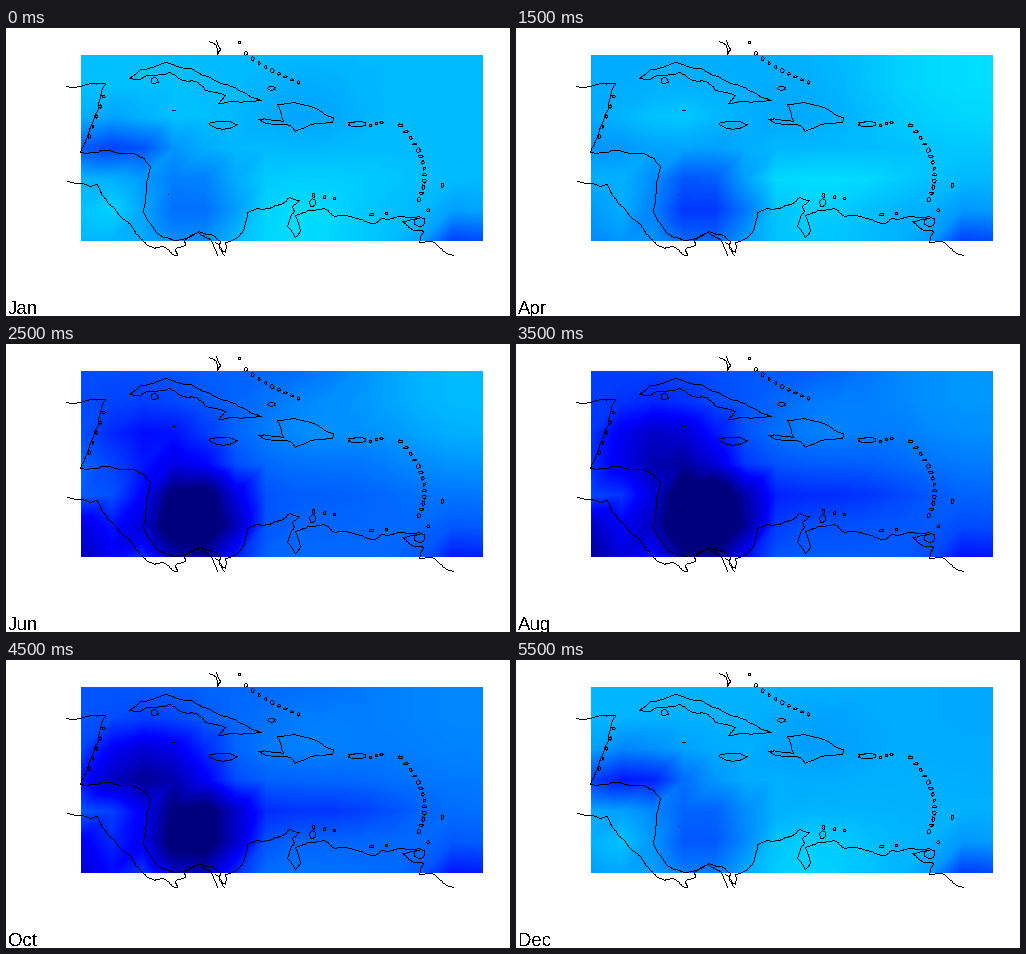
These frames come from a looping animation (504 by 288 pixels, 7.5 s). A matplotlib script:

```python
import numpy as np
import matplotlib.pyplot as plt
from matplotlib.animation import FuncAnimation
from matplotlib.colors import LinearSegmentedColormap, ListedColormap

W, H = 504, 288
LEFT, RIGHT, TOP, BOTTOM = 75, 477, 27, 213
COLS, ROWS = 14, 7
MONTHS = "Jan Feb Mar Apr May Jun Jul Aug Sep Oct Nov Dec".split()
rng = np.random.default_rng(4)

# ---- climate field: a base level plus soft seasonal spots ----
# column, row, width, height, dry-season level, wet-season level, late-year shift
SPOTS = [
    (3.6, 4.8, 1.7, 1.6, -0.28, -1.30, -0.05),   # Panama bight
    (1.1, 3.0, 1.7, 0.9, -0.45, -0.10, -0.22),   # Honduras
    (2.4, 2.4, 1.9, 1.2, 0.10, -0.50, -0.18),    # western arc
    (12.4, 6.0, 1.2, 0.9, -0.50, -0.30, 0.00),   # south-east corner
    (0.0, 5.8, 1.3, 1.2, 0.00, -0.75, -0.05),    # south-west corner
    (1.0, 4.6, 1.2, 1.0, 0.12, -0.08, 0.00),     # Pacific coast
    (13.0, 0.5, 4.5, 3.0, 0.02, 0.28, -0.10),    # open Atlantic
    (7.0, 4.0, 3.5, 0.9, 0.12, -0.15, -0.14),    # central basin
    (0.5, 0.6, 3.5, 1.6, 0.02, -0.12, 0.00),     # Yucatan channel
    (7.0, 5.6, 2.5, 1.0, 0.14, 0.00, 0.00),      # Colombian coast
    (7.3, 1.8, 1.8, 1.2, -0.09, 0.14, 0.00),     # Hispaniola
]


def season(month, dry, wet, late):
    phase = 2 * np.pi * (month - 6.5) / 12
    rain = 1 / (1 + np.exp(-4 * np.cos(phase)))
    return dry + (wet - dry) * rain + late * np.sin(phase)


def grid(month):
    r, c = np.mgrid[:ROWS, :COLS]
    g = np.full((ROWS, COLS), season(month, 0.75, 0.35, -0.04))
    for col, row, w, h, *levels in SPOTS:
        d = np.hypot((c - col) / w, (r - row) / h)
        g += season(month, *levels) * np.exp(-d ** 3)
    return g


def shade(g):
    """Linear interpolation on two triangles per cell."""
    x = (np.arange(RIGHT - LEFT) + 0.5) / (RIGHT - LEFT) * (COLS - 1)
    y = (np.arange(BOTTOM - TOP) + 0.5) / (BOTTOM - TOP) * (ROWS - 1)
    i, j = x.astype(int)[None, :], y.astype(int)[:, None]
    fx, fy = x[None, :] - i, y[:, None] - j
    nw, ne, sw, se = g[j, i], g[j, i + 1], g[j + 1, i], g[j + 1, i + 1]
    upper = nw + (ne - nw) * fx + (sw - nw) * fy
    lower = se + (sw - se) * (1 - fx) + (ne - se) * (1 - fy)
    return np.where(fx + fy <= 1, upper, lower)


fields = [shade(grid(m)) for m in range(12)]

# ---- coastlines: key points, roughened, drawn one pixel wide ----
ink = np.zeros((H, W))


def stroke(pts):
    for a, b in zip(pts[:-1], pts[1:]):
        n = int(np.abs(b - a).max()) + 2
        x, y = np.rint(np.linspace(a, b, n)).astype(int).T
        ink[y.clip(0, H - 1), x.clip(0, W - 1)] = 1


def coast(*pts, closed=False, rough=0.09):
    """Split every leg twice, pushing each midpoint sideways a little."""
    p = np.array(pts + pts[:1] if closed else pts, float)
    for _ in range(2):
        leg = np.diff(p, axis=0)
        push = rng.uniform(-rough, rough, (len(leg), 1))
        out = np.empty((2 * len(p) - 1, 2))
        out[::2] = p
        out[1::2] = (p[:-1] + p[1:]) / 2 + push * leg[:, ::-1] * (-1, 1)
        p = out
    stroke(p)


def isle(x, y, w, h):
    t = np.linspace(0, 2 * np.pi, 13)
    r = rng.uniform(0.8, 1.1, 13)
    r[-1] = r[0]
    stroke(np.c_[x + w / 2 * r * np.cos(t), y + h / 2 * r * np.sin(t)])


def chain(xs, ys, size):
    for x, y in zip(xs, ys):
        isle(x, y, *rng.uniform(0.4, 1, 2) * size)


# Central America, Caribbean side
coast((60, 58), (80, 56), (99, 55), (94, 69), (88, 88), (81, 108), (74, 124),
      (88, 124), (103, 122), (127, 125), (138, 130), (144, 138), (140, 155),
      (137, 182), (144, 195), (157, 209), (170, 212), (192, 203), (204, 206),
      (214, 213), (213, 218), (218, 227))
# Pacific side
coast((61, 153), (84, 158), (91, 156), (102, 175), (113, 187), (126, 199),
      (134, 210), (148, 220), (157, 218), (166, 226), (171, 227), (169, 221),
      (179, 217), (178, 212), (192, 204), (205, 212), (211, 227))
# Northern South America
coast((209, 214), (219, 224), (219, 214), (232, 208), (238, 199), (241, 184),
      (262, 180), (275, 176), (284, 169), (293, 172), (286, 178), (288, 183),
      (281, 198), (289, 209), (294, 203), (289, 187), (302, 182), (318, 180),
      (328, 188), (356, 191), (366, 195), (376, 190), (395, 188), (413, 190),
      (396, 193), (408, 202), (417, 203), (413, 214), (428, 214), (447, 227))
# Cuba
coast((123, 50), (135, 41), (160, 34), (184, 40), (202, 48), (220, 56),
      (238, 64), (255, 72), (235, 74), (212, 75), (219, 67), (199, 62),
      (190, 53), (172, 50), (163, 44), (143, 47), (133, 51), closed=True)
# Hispaniola
coast((252, 91), (277, 93), (271, 76), (286, 74), (308, 79), (327, 89),
      (326, 94), (305, 96), (289, 103), (284, 97), (266, 96), closed=True)
# Andros
coast((203, 13), (210, 17), (211, 26), (214, 21), (210, 12))

isle(216, 96.5, 27, 8)     # Jamaica
isle(351, 95.5, 20, 5)     # Puerto Rico
isle(413, 193, 12, 10)     # Trinidad
isle(148, 52, 8, 6)
isle(265, 60, 8, 4)
isle(168, 82, 3, 1)
isle(162, 166, 0, 0)
isle(436, 157, 3, 4)
isle(306, 174, 6, 8)

t = np.linspace(0, 1, 10)
chain(233 + 59 * t, 14 + 40 * t ** 0.6, 4)                     # Bahamas
arc = np.linspace(97, 171, 13)
chain(418 - 24 * ((147 - arc) / 50) ** 2, arc, 5)              # Lesser Antilles
chain((307, 318, 328), (167, 169, 170), 4)
chain((364, 370, 375), (97, 95, 94), 3)
chain((365, 380, 422), (186, 185, 182), 4)
chain(np.linspace(97, 83, 5), np.linspace(68, 108, 5), 4)      # Belize cays

# ---- stage ----
fig = plt.figure(figsize=(W / 72, H / 72), dpi=72, facecolor="white")
ax = fig.add_axes([0, 0, 1, 1])
ax.axis("off")
sea = LinearSegmentedColormap.from_list(
    "sea", [(0, (0, 0, 0.5)), (1 / 3, (0, 0, 1)), (1, (0, 1, 1))], N=512)
image = ax.imshow(fields[0], cmap=sea, vmin=-0.5, vmax=1, aspect="auto",
                  interpolation="nearest", extent=(LEFT, RIGHT, BOTTOM, TOP))
ax.imshow(ink, cmap=ListedColormap([(0, 0, 0, 0), (0, 0, 0, 1)]),
          aspect="auto", interpolation="nearest", extent=(0, W, H, 0))
label = ax.text(2, 286, "", family="Liberation Sans", size=18.67,
                color="black", va="baseline", antialiased=False)
ax.set_xlim(0, W)
ax.set_ylim(H, 0)


def update(step):
    month = min(step, 11)  # December holds until the loop ends
    image.set_data(fields[month])
    label.set_text(MONTHS[month])
    return image, label


anim = FuncAnimation(fig, update, frames=15, interval=500, repeat=True,
                     repeat_delay=0, blit=False)
plt.show()
```
